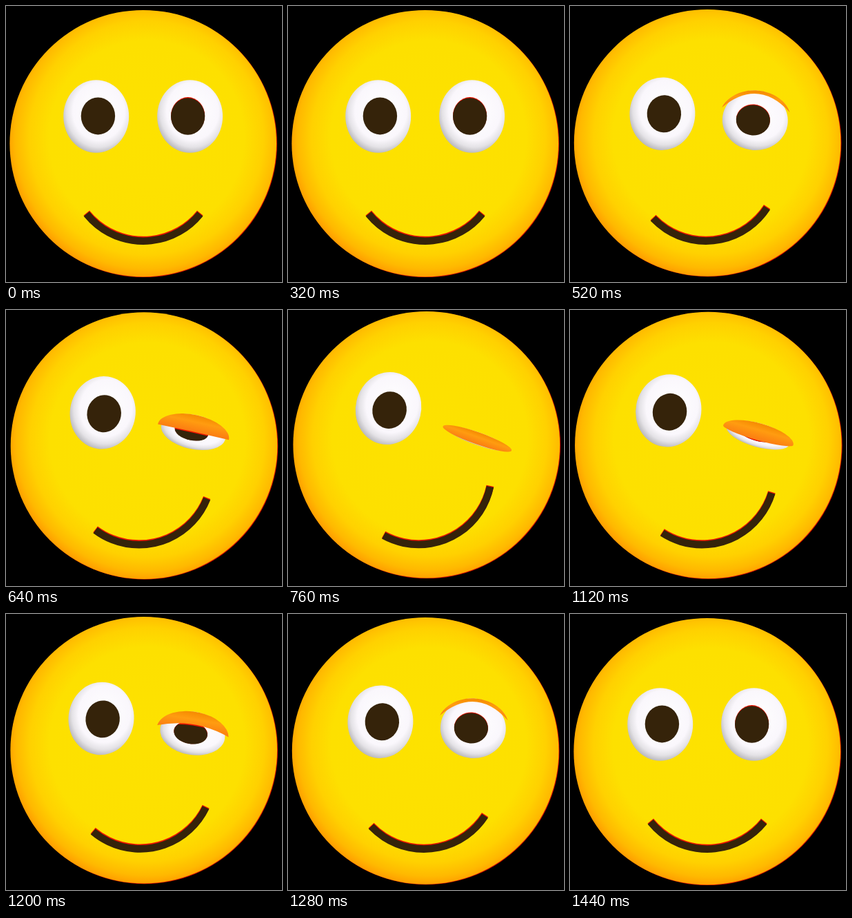
Animation, 400 px wide and 400 px high, one loop 3040 ms. Source, as an HTML page with a canvas:

```html
<!DOCTYPE html>
<html lang="en">
<head>
<meta charset="utf-8">
<title>Winking smiley</title>
<style>
html, body { margin: 0; width: 100%; height: 100%; overflow: hidden; background: #000; }
canvas { display: block; width: 100vw; height: 100vh; }
</style>
</head>
<body>
<canvas id="stage" width="400" height="400"></canvas>
<script>
const ctx = document.getElementById('stage').getContext('2d');
const LOOP = 3040, STEP = 40, RAD = Math.PI / 180, TAU = Math.PI * 2;
const RED = '#ee1400', DARK = '#35230a';

// Wink amount per step: closing starts at 440 ms, opening at 1040 ms.
const CLOSE = [.03, .1, .21, .34, .48, .622, .76, .88, .97, 1.02];
const OPEN = [1, .91, .79, .64, .476, .34, .21, .1, .03, 0];

// Eyelid: wink amount, corner height, middle of the lower edge (in eye radii).
const LID = [
  [0, -.6, -1], [.2, -.36, -.91], [.476, -.1, -.41],
  [.622, 0, -.02], [1, 0, 1], [1.1, 0, 1]
];

const mix = (a, b, p) => a + (b - a) * p;

function winkAt(ms) {
  if (ms < 440) return 0;
  if (ms < 1040) return CLOSE[Math.min(9, Math.floor((ms - 440) / STEP))];
  return OPEN[Math.min(9, Math.floor((ms - 1040) / STEP))];
}

function lidAt(p) {
  const i = LID.findIndex(k => k[0] > p);
  const a = LID[i - 1], b = LID[i], f = (p - a[0]) / (b[0] - a[0]);
  return [mix(a[1], b[1], f), mix(a[2], b[2], f)];
}

function radial(x, y, r, stops) {
  const g = ctx.createRadialGradient(x, y, 0, x, y, r);
  stops.forEach(([at, color]) => g.addColorStop(at, color));
  return g;
}

function oval(x, y, rx, ry, fill) {
  ctx.beginPath();
  ctx.ellipse(x, y, rx, ry, 0, 0, TAU);
  ctx.fillStyle = fill;
  ctx.fill();
}

function face(p) {
  const x = 198.7 + 2.1 * p, y = 199.2 - 4.1 * p, r = 193.3;
  oval(x + .9, y + .6, r, r, '#d80800');
  oval(x, y, r, r, radial(x + 5, y - 8, 202, [
    [0, '#fde200'], [.7, '#fde000'], [.84, '#ffd100'], [.94, '#ffb900'], [1, '#ff9f00']
  ]));
}

function eyeball(rx, ry) {
  ctx.save();
  ctx.scale(rx, ry);
  oval(0, 0, 1, 1, radial(.08, -.14, 1.16, [
    [0, '#ffffff'], [.68, '#faf7fc'], [.85, '#e4e2e6'], [1, '#b9b8bc']
  ]));
  ctx.restore();
}

function leftEye(p) {
  ctx.save();
  ctx.translate(mix(130.7, 146, p), mix(160, 142, p));
  ctx.rotate(14 * RAD * p);
  eyeball(47.5, 52.8);
  ctx.restore();
  ctx.save();
  ctx.translate(mix(133.4, 147.5, p), mix(159.4, 144.6, p));
  ctx.rotate(14 * RAD * p);
  oval(0, 0, 24.7, 27, DARK);
  ctx.restore();
}

function lidEdge(x, corner, middle) {
  if (middle > corner) ctx.ellipse(0, corner, x, middle - corner, 0, 0, Math.PI);
  else ctx.quadraticCurveTo(0, 2 * middle - corner, -x, corner);
}

function rightEye(p) {
  const ry = 52.8 - 45 * p, k = ry / 52.8;
  ctx.save();
  ctx.translate(mix(266.6, 274.5, p), mix(160, 187, p));
  ctx.rotate(20 * RAD * p);
  if (p < .99) {
    eyeball(47.5, ry);
    const px = mix(-3, -2.5, p);
    oval(px, -.9 * k, 24.6, 27 * k, RED);
    oval(px, 0, 24.6, 26.8 * k, DARK);
  }
  if (p > 0) {
    const [corner, middle] = lidAt(p).map(v => v * ry);
    const a = Math.asin(corner / ry), x = 52.7 * Math.cos(a);
    if (p < .99) {
      ctx.save();
      ctx.beginPath();
      ctx.ellipse(-3, 0, 24.6, 27 * k, 0, 0, TAU);
      ctx.clip();
      ctx.beginPath();
      ctx.moveTo(x, corner);
      lidEdge(x, corner, middle);
      ctx.strokeStyle = RED;
      ctx.lineWidth = 3;
      ctx.stroke();
      ctx.restore();
    }
    const g = ctx.createLinearGradient(0, -ry, 0, Math.max(middle, corner));
    g.addColorStop(0, '#f58a00');
    g.addColorStop(.4, '#ff9c10');
    g.addColorStop(1, '#fb7c12');
    ctx.beginPath();
    ctx.ellipse(0, 0, 52.7, ry, 0, Math.PI - a, TAU + a);
    lidEdge(x, corner, middle);
    ctx.closePath();
    ctx.fillStyle = g;
    ctx.fill();
  }
  ctx.restore();
}

function mouth(p) {
  const x = 199 - 9.8 * p, y = 234.5 - .7 * p;
  const mid = 90 - 25.4 * p, half = 51.1 + 2.4 * p;
  const arc = (dy, color, width) => {
    ctx.beginPath();
    ctx.arc(x, y + dy, 105.7, (mid - half) * RAD, (mid + half) * RAD);
    ctx.strokeStyle = color;
    ctx.lineWidth = width;
    ctx.stroke();
  };
  arc(-.9, RED, 11);
  arc(.5, DARK, 10.6);
}

function draw(now) {
  const p = winkAt(now % LOOP);
  ctx.fillStyle = '#000';
  ctx.fillRect(0, 0, 400, 400);
  face(p);
  leftEye(p);
  rightEye(p);
  mouth(p);
}

const start = performance.now();
function tick() {
  draw(performance.now() - start);
  requestAnimationFrame(tick);
}
tick();
</script>
</body>
</html>
```
